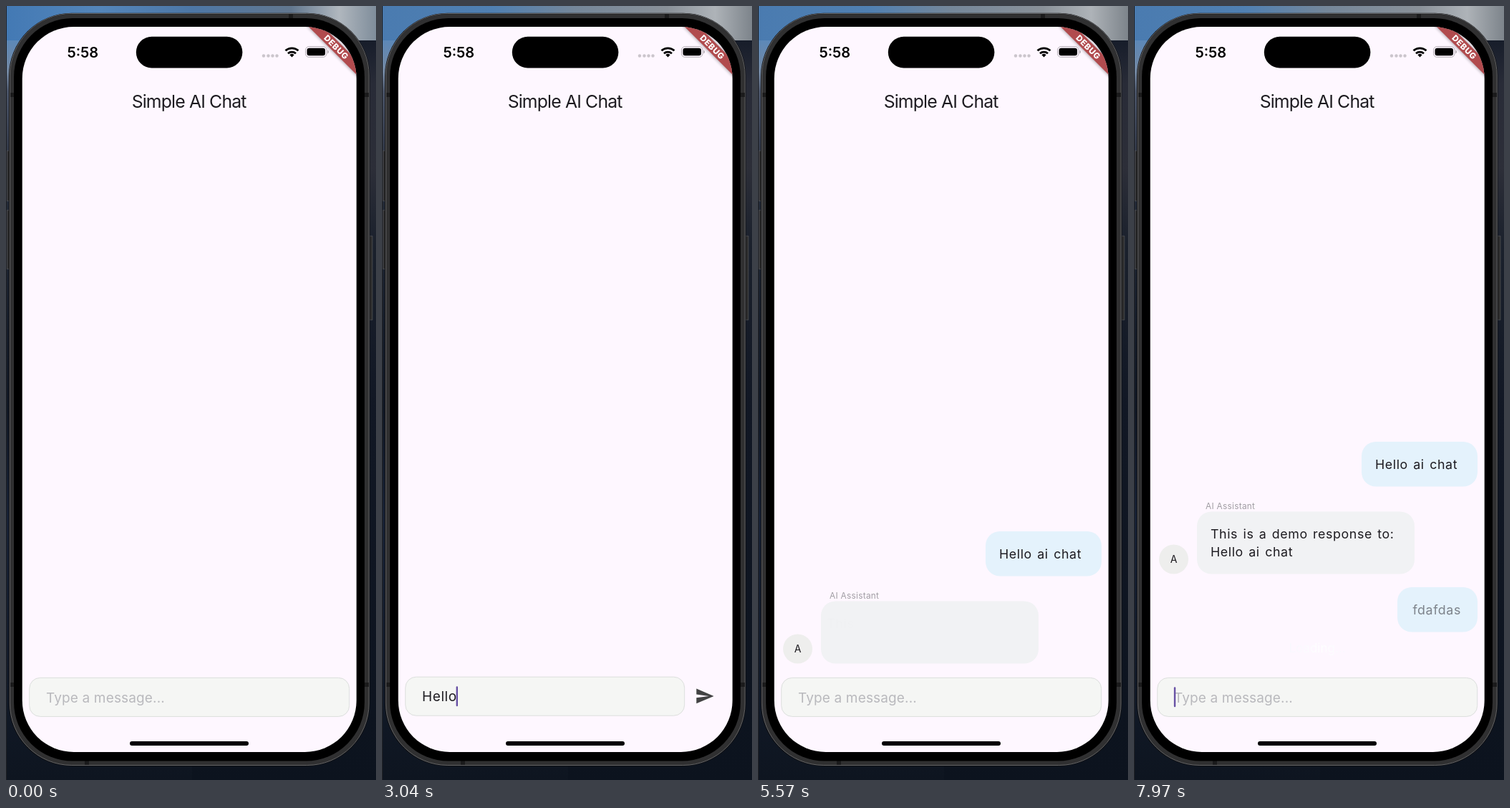
Animation, 517 px wide and 1080 px high, one loop 8 s. Source, as an HTML page:

```html
<!DOCTYPE html>
<html lang="en">
<head>
<meta charset="utf-8">
<title>Chat demo</title>
<style>
html, body { margin: 0; width: 100%; height: 100%; overflow: hidden; background: #0d1522; }
svg { display: block; width: 517px; height: 1080px; font-family: Inter, Roboto, sans-serif; }
text { white-space: pre; fill: #1d1b20; }
.msg { font-size: 17.8px; letter-spacing: .6px; word-spacing: 1.8px; }
.field { font-size: 19px; }
</style>
</head>
<body>
<svg viewBox="0 0 517 1080">
  <defs>
    <linearGradient id="left" x2="0" y2="1">
      <stop offset=".04" stop-color="#5a88ba"/><stop offset=".085" stop-color="#7488a2"/>
      <stop offset=".11" stop-color="#4a5468"/><stop offset=".18" stop-color="#343b4b"/>
      <stop offset=".26" stop-color="#222936"/><stop offset=".42" stop-color="#151c29"/>
      <stop offset=".52" stop-color="#101724"/><stop offset=".66" stop-color="#172135"/>
      <stop offset="1" stop-color="#0e1520"/>
    </linearGradient>
    <linearGradient id="right" x2="0" y2="1">
      <stop offset=".045" stop-color="#171d2a"/><stop offset=".1" stop-color="#282b37"/>
      <stop offset=".21" stop-color="#2c2e38"/><stop offset=".31" stop-color="#1a202c"/>
      <stop offset=".52" stop-color="#111724"/><stop offset="1" stop-color="#0c131e"/>
    </linearGradient>
    <linearGradient id="skyA">
      <stop offset="0" stop-color="#4379b4"/><stop offset=".25" stop-color="#5486bb"/>
      <stop offset=".5" stop-color="#4d77a6"/><stop offset=".77" stop-color="#62778f"/>
      <stop offset=".9" stop-color="#b0b7be"/><stop offset="1" stop-color="#7f8d9b"/>
    </linearGradient>
    <linearGradient id="skyB">
      <stop offset="0" stop-color="#4a7bb0"/><stop offset=".3" stop-color="#5080b2"/>
      <stop offset=".52" stop-color="#75879a"/><stop offset=".77" stop-color="#8a9199"/>
      <stop offset=".9" stop-color="#aeb3b8"/><stop offset="1" stop-color="#7d848b"/>
    </linearGradient>
    <linearGradient id="shine" gradientUnits="userSpaceOnUse" x1="0" x2="70" y1="0" y2="0">
      <stop offset="0" stop-color="#f9f8fe"/><stop offset=".5" stop-color="#fff"/>
      <stop offset="1" stop-color="#f9f8fe"/>
    </linearGradient>
    <clipPath id="screen"><rect x="22.700" y="29" width="467" height="1012" rx="72"/></clipPath>
    <filter id="soft" x="-20%" y="-60%" width="140%" height="220%"><feGaussianBlur stdDeviation="2.5"/></filter>
  </defs>

  <!-- wallpaper -->
  <rect width="260" height="1080" fill="url(#left)"/>
  <rect x="260" width="257" height="1080" fill="url(#right)"/>
  <rect id="sky" width="517" height="48"/>
  <rect width="1" height="1080" fill="#1d1f24"/>

  <!-- phone body -->
  <g fill="#2b2b2c" stroke="#55565a" stroke-width=".7">
    <rect x="1.500" y="202" width="5" height="70"/>
    <rect x="1.500" y="285" width="5" height="82"/>
    <rect x="506" y="321" width="6" height="117"/>
  </g>
  <rect x="4.700" y="10.500" width="503" height="1049.500" rx="87" fill="#303031" stroke="#0d0d0e" stroke-width="1.400"/>
  <rect x="5.400" y="10.500" width="501.800" height="1049" rx="86.500" fill="none" stroke="#77787b" stroke-width=".8"/>
  <path d="M395 11h6v7h-6zM110 1053h6v6h-6zM6 121h6v6h-6zM501 121h6v6h-6zM6 944h6v6h-6zM501 944h6v6h-6z" fill="#1b1b1c"/>
  <rect x="11" y="17" width="490" height="1036.500" rx="82" fill="#000"/>
  <rect x="22.700" y="29" width="467" height="1012" rx="72" fill="#fef7ff"/>

  <!-- status bar -->
  <g clip-path="url(#screen)">
    <g transform="translate(490 29) rotate(45)">
      <rect x="-50" y="33" width="100" height="14.400" fill="#000" opacity=".45" filter="url(#soft)"/>
      <rect x="-50" y="33" width="100" height="14.400" fill="#b14b4e"/>
      <text y="44.400" text-anchor="middle" font-size="11.500" font-weight="800" letter-spacing=".6" style="fill:#fff">DEBUG</text>
    </g>
  </g>
  <text x="85.500" y="71.500" font-size="20" font-weight="600" style="fill:#000">5:58</text>
  <rect x="181.800" y="42.800" width="148.600" height="43.600" rx="21.800" fill="#000"/>
  <g fill="#cbc5cc">
    <circle cx="360" cy="69.500" r="2.200"/><circle cx="366.500" cy="69.500" r="2.200"/>
    <circle cx="372.500" cy="69.500" r="2.200"/><circle cx="378.500" cy="69.500" r="2.200"/>
  </g>
  <g fill="none" stroke="#000" stroke-width="2.800">
    <path d="M390.500 62.300a13.500 13.500 0 0 1 18 0M394 66.200a8.300 8.300 0 0 1 11 0"/>
    <path d="M396.400 68.300L399.500 71.600L402.600 68.300A4.500 4.500 0 0 0 396.400 68.300Z" fill="#000" stroke="none"/>
  </g>
  <rect x="418.500" y="56.700" width="29.500" height="14.600" rx="4.800" fill="none" stroke="#b3adb4"/>
  <rect x="420.500" y="58.700" width="25.500" height="10.600" rx="3.200" fill="#000"/>
  <path d="M449.300 61.500q1.800 .8 1.800 2.500t-1.800 2.500z" fill="#b3adb4"/>

  <text x="255.600" y="142" text-anchor="middle" font-size="24.800" letter-spacing="-.85">Simple AI Chat</text>
  <g id="chat"></g>
  <text id="loading" x="256" y="902" text-anchor="middle" font-size="17" style="fill:url(#shine)">Loading...</text>

  <!-- input row -->
  <rect id="box" x="32.700" width="447" height="54" rx="15" fill="#f5f6f4" stroke="#dcdfdd"/>
  <text id="hint" class="field" x="56" y="971.500" letter-spacing=".15" style="fill:#b9b9bd">Type a message...</text>
  <text id="typed" class="field" x="56" y="970" letter-spacing=".6"></text>
  <rect id="caret" width="2.400" height="28" rx="1.200" fill="#6750a4"/>
  <path id="send" transform="translate(437 949) scale(1.16)" d="M2 21L23 12 2 3v7l15 2-15 2z" fill="#434344"/>
  <rect x="173" y="1026" width="166" height="6" rx="3" fill="#000"/>
</svg>

<script>
const LOOP = 8000;
const $ = id => document.getElementById(id);
const clamp = v => Math.min(1, Math.max(0, v));
const show = (el, on) => el.setAttribute('visibility', on ? 'visible' : 'hidden');

function add(parent, tag, attrs, text) {
  const el = document.createElementNS('http://www.w3.org/2000/svg', tag);
  for (const k in attrs) el.setAttribute(k, attrs[k]);
  if (text) el.textContent = text;
  parent.append(el);
  return el;
}

// at: insertion time, fade: when the words start, dir: side the text slides in from
const messages = [
  { at: 4540, fade: 4540, dir: 1, x: 318, w: 162, h: 62.5, lines: ['Hello ai chat'] },
  { at: 5570, fade: 5570, dir: -1, x: 88, w: 304, h: 87, lines: ['This is a demo response to:', 'Hello ai chat'] },
  { at: 7670, fade: 7870, dir: 1, x: 368, w: 112, h: 62.5, lines: ['fdafdas'] }
];
for (const m of messages) {
  m.el = add($('chat'), 'g');
  add(m.el, 'rect', { x: m.x, width: m.w, height: m.h, rx: 20, fill: m.dir > 0 ? '#e4f2fc' : '#f1f2f4' });
  if (m.dir < 0) {
    add(m.el, 'text', { x: 100, y: -3.5, 'font-size': 11.8, 'letter-spacing': .3, style: 'fill:#a09da3' }, 'AI Assistant');
    add(m.el, 'circle', { cx: 55.5, cy: 66.5, r: 20.5, fill: '#eeeeed' });
    add(m.el, 'text', { x: 55.5, y: 71.5, 'font-size': 14, 'text-anchor': 'middle' }, 'A');
  }
  m.body = add(m.el, 'g');
  m.words = m.lines.flatMap((line, i) => {
    const row = add(m.body, 'text', { class: 'msg', x: m.x + 19, y: 37.7 + i * 25 });
    return line.split(' ').map(word => add(row, 'tspan', {}, word + ' '));
  });
}

// Each session: focus time, blink phase, send time and [time, letters] strokes
const sessions = [
  { focus: 940, phase: 750, send: 4540, keys: [[2500, 'H'], [2600, 'e'], [2700, 'l'], [2870, 'l'], [3040, 'o'],
    [3240, ' '], [3540, 'a'], [3670, 'i'], [3800, ' '], [3970, 'c'], [4040, 'h'], [4100, 'a'], [4340, 't']] },
  { focus: 6900, phase: 6900, send: 7670, keys: [[7100, 'f'], [7200, 'da'], [7340, 'f'], [7400, 'd'], [7450, 'a'], [7500, 's']] }
];

function blink(age) {
  const p = age % 1000;
  return p < 800 ? clamp(1 - (p - 530) / 100) : clamp((p - 890) / 100);
}

function drawInput(t) {
  const s = sessions.find(s => t >= s.focus && t < s.send);
  const keys = s ? s.keys.filter(k => k[0] <= t) : [];
  const text = keys.map(k => k[1]).join('');
  const on = text !== '';
  $('typed').textContent = text;
  show($('typed'), on);
  show($('hint'), !on);
  show($('send'), on);
  $('box').setAttribute('width', on ? 390 : 447);
  $('box').setAttribute('y', on ? 936.2 : 937.4);
  const x = on ? 54.8 + $('typed').getComputedTextLength() : 55.8;
  $('caret').setAttribute('x', x);
  $('caret').setAttribute('y', on ? 949.3 : 950.3);
  const since = on ? keys[keys.length - 1][0] : s ? s.phase : 7670;
  $('caret').setAttribute('opacity', s || t >= 7670 ? blink(t - since) : 0);
}

function drawChat(t) {
  const top = t < 5570 ? 811 : t < 7100 ? 733 : t < 7670 ? 730.5 : 608;
  const tops = [top, top + 97.5, 811];
  messages.forEach((m, i) => {
    show(m.el, t >= m.at);
    m.el.setAttribute('transform', `translate(0 ${tops[i]})`);
    const slide = m.dir * 10.75 * (1 - clamp((t - m.at) / 390));
    m.body.setAttribute('transform', `translate(${slide} 0)`);
    m.words.forEach((w, n) => {
      const p = clamp((t - m.fade - n * 50) / 330);
      w.setAttribute('fill-opacity', 1 - (1 - p) ** 2);
    });
  });
  show($('loading'), (t >= 4540 && t < 5570) || t >= 7670);
  const start = t < 7670 ? 4540 : 7670;
  $('shine').setAttribute('gradientTransform', `translate(${190 + (t - start) % 1000 * .12} 0)`);
}

function draw(now) {
  const t = now % LOOP;
  $('sky').setAttribute('fill', t < 500 ? 'url(#skyA)' : 'url(#skyB)');
  drawInput(t);
  drawChat(t);
  requestAnimationFrame(() => draw(performance.now()));
}
draw(0);
</script>
</body>
</html>
```
